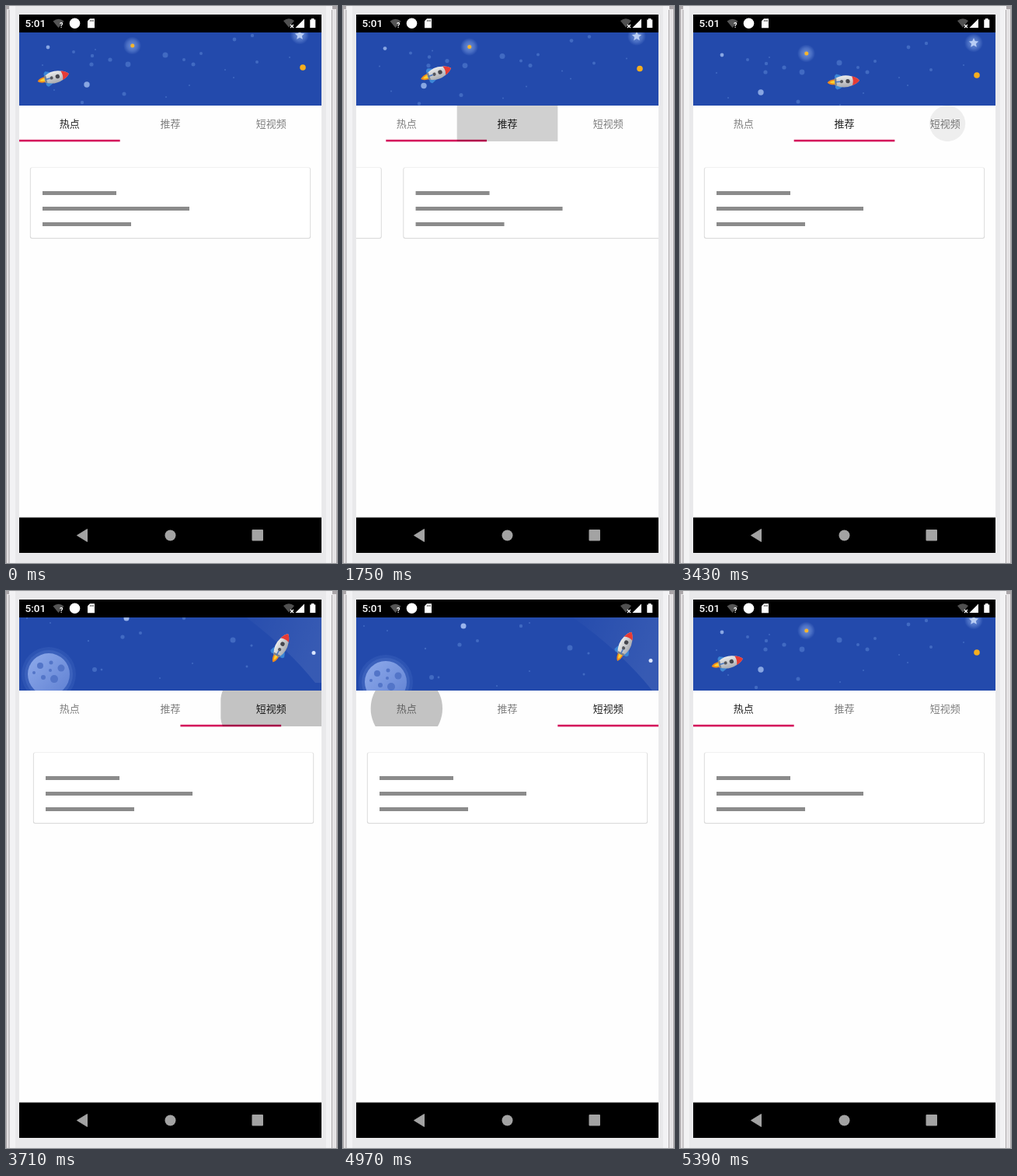
An HTML page that plays this animation: 426x716 px, repeating every 6.79 s.

```html
<!DOCTYPE html>
<html lang="zh">
<head>
<meta charset="utf-8">
<title>Tabs</title>
<style>
  html, body { margin: 0; width: 100%; height: 100%; overflow: hidden; background: #f2f2f4; }
  svg { display: block; width: 426px; height: 716px; }
  .tab { font: 13px "Noto Sans CJK SC", "Noto Sans CJK", "Noto Sans", sans-serif; text-anchor: middle; }
  .clock { font: 500 13.5px Roboto, sans-serif; fill: #fff; }
</style>
</head>
<body>
<svg viewBox="0 0 426 716">
  <defs>
    <clipPath id="screen"><rect x="17" y="11" width="389" height="692"/></clipPath>
    <clipPath id="banner"><rect x="17" y="34" width="389" height="94"/></clipPath>
    <clipPath id="cell"><rect id="cellBox" y="128" width="129.7" height="46"/></clipPath>
    <radialGradient id="glow">
      <stop offset="0" stop-color="#a9c4f4" stop-opacity=".6"/>
      <stop offset=".6" stop-color="#8fb0ee" stop-opacity=".35"/>
      <stop offset="1" stop-color="#8fb0ee" stop-opacity="0"/>
    </radialGradient>
    <linearGradient id="moon" x2="1" y2="1">
      <stop offset="0" stop-color="#8fabeb"/><stop offset="1" stop-color="#5f80d2"/>
    </linearGradient>
    <linearGradient id="beam" x2="1" y2=".3">
      <stop offset="0" stop-color="#fff" stop-opacity=".01"/><stop offset="1" stop-color="#fff" stop-opacity=".09"/>
    </linearGradient>
    <linearGradient id="hull" x2="0" y2="1">
      <stop offset="0" stop-color="#ececec"/><stop offset="1" stop-color="#a9abb0"/>
    </linearGradient>
    <g id="card">
      <rect x="31" y="208" width="361" height="91.3" rx="2.5" fill="#000" opacity=".1"/>
      <rect x="30.7" y="207.2" width="361.6" height="91.4" rx="2.5" fill="#000" opacity=".07"/>
      <rect x="31.7" y="208" width="359.6" height="90" rx="2" fill="#fff"/>
      <path d="M47 240.5h95M47 260.5h189M47 280.5h114" stroke="#8b8b8b" stroke-width="5"/>
    </g>
  </defs>

  <rect width="426" height="716" fill="#f2f2f4"/>
  <path d="M12 0h400v716h-400z" fill="#e9e9eb"/>
  <path d="M2.5 0v716M422.5 0v716" stroke="#e3e1e3" stroke-width="4"/>
  <path d="M.5 0v716M4 5v711M419.5 5v711M425.5 0v716" stroke="#aaa6a9"/>
  <path d="M0 2h4M420 2h6" stroke="#aaa6a9" stroke-width="4"/>

  <g clip-path="url(#screen)">
    <rect x="17" y="11" width="389" height="692" fill="#fefefe"/>
    <g id="pages">
      <use href="#card"/><use href="#card" x="389"/><use href="#card" x="778"/>
    </g>
    <g clip-path="url(#banner)">
      <rect x="17" y="34" width="389" height="94" fill="#234aac"/>
      <g id="sky"></g>
      <g id="rocket">
        <path d="M-9-3.5Q-17-4-20.5 0Q-17 4-9 3.5Z" fill="#f08a1d"/>
        <path d="M-9-2Q-15-2-17.5 0Q-15 2-9 2Z" fill="#ffd22e"/>
        <path d="M-10-4Q-12-8-8-10Q-4-9 1-5.5ZM-10 4Q-12 8-8 10Q-4 9 1 5.5Z" fill="#3c86d6"/>
        <path d="M-11-4Q0-10 11-6Q18-4 21 0Q18 4 11 6Q0 10-11 4Z" fill="url(#hull)"/>
        <path d="M11.5-5.9Q18-4 21 0Q18 4 11.5 5.9Q14 0 11.5-5.9Z" fill="#e63b35"/>
        <path d="M-11-4l2.5-1v10l-2.5-1Z" fill="#7c8088"/>
        <circle cx="6" r="2.7" fill="#45464d"/><circle cx="-2" r="2.1" fill="#55575e"/>
        <path d="M-10 0h6" stroke="#4a78c0" stroke-width="1.6"/>
      </g>
    </g>
    <g id="tabs"></g>
    <rect id="bar" y="171.8" width="129.7" height="2.6" fill="#d4145c"/>
    <g clip-path="url(#cell)"><circle id="ripple" cy="151"/></g>

    <rect x="17" y="11" width="389" height="23"/>
    <text class="clock" x="24.5" y="27.3">5:01</text>
    <path d="M60.500 19.500Q67.500 14 74.500 19.500L67.500 28Z" fill="#555"/>
    <text x="69" y="28" fill="#fff" font-family="Roboto, sans-serif" font-size="9" font-weight="700">?</text>
    <circle cx="88.500" cy="22.300" r="6.800" fill="#fff"/>
    <path d="M108 16.300h6v12h-9v-9Z" fill="#fff"/>
    <path d="M108.500 18v2M110.500 18v2M112.300 18v2" stroke="#000" stroke-width=".7"/>
    <path d="M357 19Q364 13.500 371 19L364 27.500Z" fill="#505050"/>
    <path d="M366 24l4 4m0-4l-4 4" stroke="#fff" stroke-width="1.300"/>
    <path d="M384 16.500v11.500h-11.500Z" fill="#fff"/>
    <path d="M393 16h3.500v1.500h1.800v10.500h-7v-10.500h1.700Z" fill="#fff"/>

    <rect x="17" y="657.500" width="389" height="46"/>
    <path d="M91.500 680.500L104.500 672.500v16Z" fill="#a3a3a3" stroke="#a3a3a3" stroke-linejoin="round"/>
    <circle cx="211.500" cy="680.500" r="7" fill="#a3a3a3"/>
    <rect x="316.500" y="673" width="14.500" height="14.500" rx="1" fill="#a3a3a3"/>
  </g>
</svg>
<script>
const $ = id => document.getElementById(id);
const LOOP = 6790, TICK = 70, PAGE = 389, TAB = PAGE / 3, RISE = 122;

// press and release times, tabs, scroll length, banner lag, touch offset
const moves = [
  { press: 1400, go: 1668, from: 0, to: 1, dur: 237, lag: 27, dx: 0 },
  { press: 3430, go: 3592, from: 1, to: 2, dur: 197, lag: 11, dx: 3 },
  { press: 4830, go: 5061, from: 2, to: 0, dur: 277, lag: 27, dx: 0 }
];

const clamp = v => Math.max(0, Math.min(1, v));
const mix = (a, b, p) => a + (b - a) * p;
const quad = ([a, b, c], p) => mix(mix(a, b, p), mix(b, c, p), p);
const quint = p => 1 - (1 - clamp(p)) ** 5;

// cubic-bezier(.4, 0, .2, 1)
function standard(x) {
  let lo = 0, hi = 1, s = .5;
  x = clamp(x);
  if (x === 0 || x === 1) return x;
  for (let i = 0; i < 24; i++) {
    s = (lo + hi) / 2;
    const r = 1 - s;
    if (1.2 * r * r * s + .6 * r * s * s + s ** 3 < x) lo = s; else hi = s;
  }
  return s * s * (3 - 2 * s);
}

// sky: dots as x, y, radius
const dot = (x, y, r, fill) => `<circle cx="${x}" cy="${y}" r="${r}" fill="${fill}"/>`;
const dots = (list, fill, dy = 0) => list.map(([x, y, r]) => dot(x, y + dy, r, fill)).join('');
const low = [[87, 59, 2], [111, 64, 2.2], [110, 75, 2.6], [134, 69, 2.6], [157, 75, 3.4], [205, 63, 3.5],
  [229, 69, 2], [241, 75, 2.5], [251, 61, 2], [294, 43, 2.4], [317, 38, 2.2], [323, 72, 2], [152, 113, 2.5],
  [98, 124, 2.2], [293, 92, 1], [206, 117, 1], [115, 56, 1], [62, 108, 1], [47, 76, 1], [236, 102, 1], [282, 82, 1], [365, 66, 1]];
const high = [[150, 69, 2.6], [173, 64, 2], [292, 73, 3.5], [114, 111, 3], [229, 45, 2.2], [240, 41, 1], [310, 107, 1.5],
  [57, 51, 1], [106, 74, 1.2], [123, 111, 1.4], [198, 122, 1], [240, 103, 1], [316, 80, 1.6], [27, 45, 1]];
const star = Array.from({ length: 10 }, (_, i) => {
  const r = i % 2 ? 3 : 6.5, a = i * Math.PI / 5;
  return `${378 + r * Math.sin(a)},${37.5 - r * Math.cos(a)}`;
}).join(' ');
const craters = [[44, 106, 4], [58, 102, 2.5], [71, 109, 4.5], [48, 121, 3], [62, 123, 5], [36, 115, 2], [57, 112, 2]];

$('sky').innerHTML =
  dots(low, '#416ac2') + dot(54, 53, 2.4, '#88a6e2') + dot(104, 101, 3.7, '#88a6e2') +
  dot(162.5, 51, 11.5, 'url(#glow)') + dot(162.8, 51, 2.5, '#f6b52c') +
  dot(378, 37.5, 12, 'url(#glow)') + `<polygon points="${star}" fill="#b8cdf5"/>` + dot(382, 79, 3.8, '#f6ae1e') +
  `<g transform="translate(0 ${-RISE - 10})"><path d="M296 34H406V128H398Q360 80 296 34Z" fill="url(#beam)"/>` +
  dots(high, '#416ac2') + dot(155, 45, 3.5, '#9bb5ec') + dot(396, 89.5, 2.5, '#dbe6ff') +
  dot(55, 117, 35, '#7394df22') + dot(55, 117, 31, '#7394df33') + dot(55, 117, 27, 'url(#moon)') +
  dots(craters, '#5375c8') + '</g>';

const tabX = i => 17 + TAB * i;
$('tabs').innerHTML = ['热点', '推荐', '短视频']
  .map((s, i) => `<text class="tab" x="${tabX(i) + TAB / 2}" y="156">${s}</text>`).join('');
const labels = [...$('tabs').children];

const path = [
  { x: [60.500, 135.250, 210], y: [92, 80, 97], a: [-14, -30, -4] },
  { x: [210, 286, 362], y: [97, 88, 71.500], a: [-4, -45, -64] }
];

function drawBanner(pos) {
  const leg = Math.min(1, Math.floor(pos));
  const f = (pos - leg) ** 3, p = path[leg];
  const shift = leg ? 10 + RISE * f ** 1.4 : 10 * f * f;
  $('sky').setAttribute('transform', `translate(0 ${shift})`);
  $('rocket').setAttribute('transform', `translate(${quad(p.x, f)} ${quad(p.y, f)}) rotate(${quad(p.a, f)})`);
}

function drawRipple(m, age) {
  const on = m && age >= 0 && age < 540;
  const alpha = on ? .23 * clamp((age + 20) / 75) * clamp((540 - age) / 240) : 0;
  $('ripple').setAttribute('opacity', alpha);
  if (!on) return;
  $('cellBox').setAttribute('x', tabX(m.to));
  $('ripple').setAttribute('cx', tabX(m.to) + TAB / 2 + m.dx);
  $('ripple').setAttribute('r', Math.min(70, 23.1 + .165 * age));
}

function draw(t) {
  const m = moves.filter(k => t >= k.press).pop();
  let page = 0, head = 0, line = 0, active = 0;
  if (m) {
    const e = t - m.go;
    page = mix(m.from, m.to, quint(e / m.dur));
    head = mix(m.from, m.to, quint((e - m.lag) / m.dur));
    line = mix(m.from, m.to, standard(e / 300));
    active = e >= 0 ? m.to : m.from;
  }
  $('pages').setAttribute('transform', `translate(${-page * PAGE} 0)`);
  $('bar').setAttribute('x', tabX(line));
  labels.forEach((el, i) => el.setAttribute('fill', i === active ? '#202020' : '#7d7d7d'));
  drawBanner(head);
  drawRipple(m, m ? t - m.press : 0);
}

const start = performance.now();
function loop() {
  const t = (performance.now() - start) % LOOP;
  draw(Math.floor(t / TICK) * TICK);
  requestAnimationFrame(loop);
}
loop();
</script>
</body>
</html>
```
